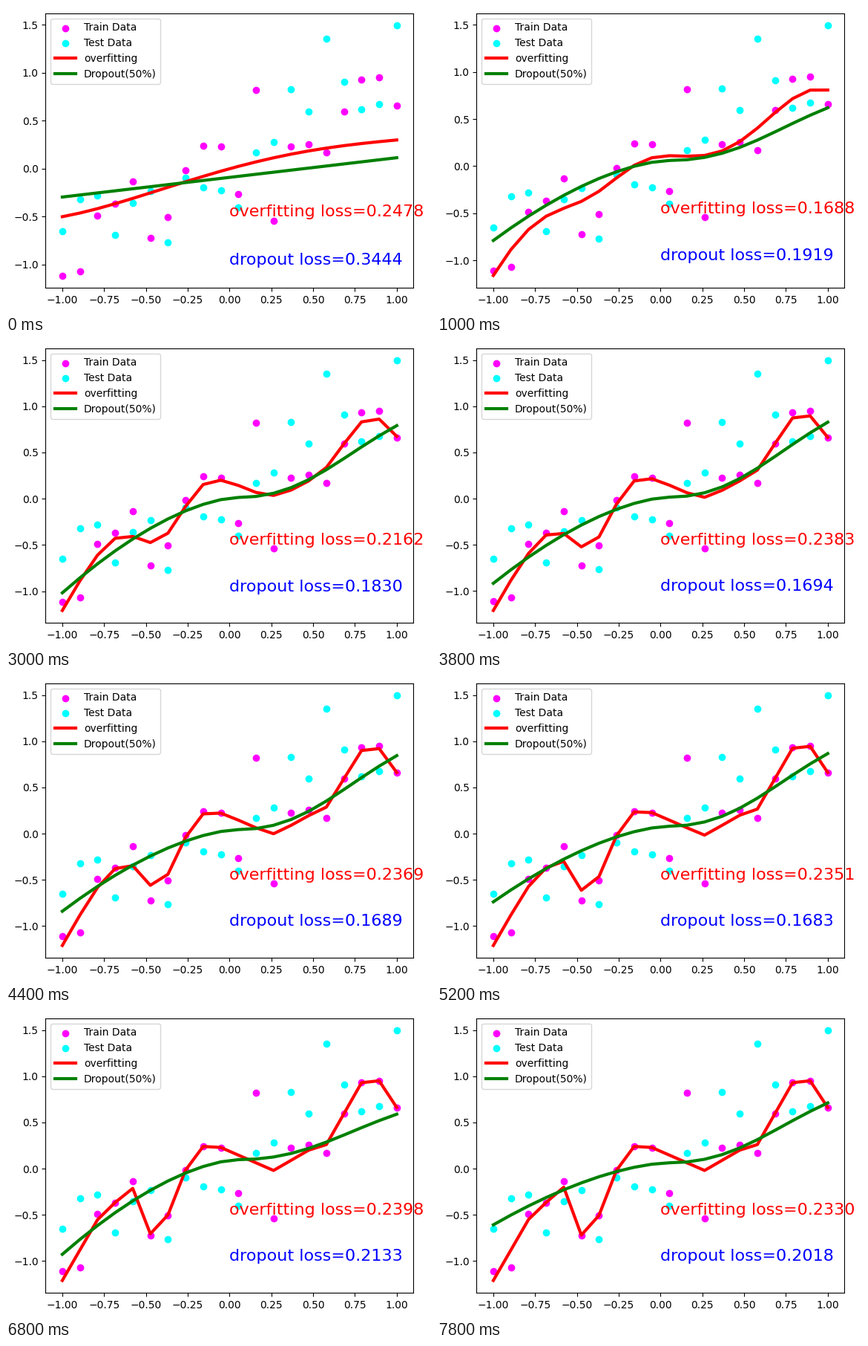
These frames come from a looping animation (573x413 px, 8 s). A matplotlib script:

```python
import numpy as np
import matplotlib.pyplot as plt
from matplotlib.animation import FuncAnimation

W, H, DPI = 573, 413, 100
FRAMES, INTERVAL = 40, 200
WARMUP = 5  # frames until both nets leave their untrained shape

x = np.linspace(-1, 1, 20)
train = np.array([-1.113, -1.07, -.488, -.366, -.133, -.72, -.507, -.017, .24, .229,
                  -.262, .818, -.54, .229, .258, .167, .595, .93, .95, .661])
test = np.array([-.651, -.319, -.279, -.69, -.356, -.235, -.767, -.093, -.193, -.224,
                 -.402, .167, .282, .827, .598, 1.353, .909, .618, .675, 1.492])

# Readings at a few stages of the training
stages = [0, 5, 11, 19, 26, 34, 39]
over_loss = [.2478, .1688, .1942, .2383, .2351, .2398, .2330]
drop_loss = [.3444, .1919, .1965, .1694, .1683, .2133, .2018]
drop_mid = [.06, .06, .012, .016, .08, .097, .063]
drop_left = [.85, .85, 1.13, .932, .818, 1.024, .671]
drop_right = [.56, .56, .742, .811, .786, .492, .648]

# The overfitted net ends on the training points but cuts across the outliers
index = np.arange(len(x))
fit = train.copy()
fit[[0, 2, 4, 12, 14, 15]] = -1.21, -.55, -.2, -.02, .2, .26
kept = np.setdiff1d(index, [1, 10, 11, 13])
fit = np.interp(index, kept, fit[kept])


def staged(frame, values):
    return np.interp(frame, stages, values)


def local_fit(i, width):
    """Value at point i of a line fitted to its neighbourhood."""
    d = index - i
    return np.polyfit(d, fit, 1, w=np.exp(-(d / width) ** 2 / 4))[1]


def warm(frame, start, curve):
    return start + (curve - start) * min(frame / WARMUP, 1)


def over_curve(frame):
    """Fit whose smoothing narrows with time, more slowly on the left."""
    decay = np.where(x < -.3, 18, 13)
    widths = np.maximum(1.8 * np.exp(-max(frame - WARMUP, 0) / decay), .25)
    start = .48 * x - .16 * x**2 - .08 * x**3 + .06 * x**4
    return warm(frame, start, np.array([local_fit(i, s) for i, s in zip(index, widths)]))


def drop_curve(frame):
    """Plateau with a falling left arm and a rising right arm."""
    left = np.maximum(.05 - x, 0) / 1.05
    right = np.maximum(x - .05, 0) / .95
    curve = (staged(frame, drop_mid)
             - staged(frame, drop_left) * left ** 1.62
             + staged(frame, drop_right) * right ** 2 * (1 + .25 * np.sin(np.pi * right)))
    return warm(frame, .205 * x - .09, curve)


fig = plt.figure(figsize=(W / DPI, H / DPI), dpi=DPI, facecolor="white")
ax = fig.add_axes([53.4 / W, 33.7 / H, 496 / W, 369.6 / H])
ax.scatter(x, train, c="magenta", label="Train Data")
ax.scatter(x, test, c="cyan", label="Test Data")
over_line, = ax.plot(x, over_curve(0), "red", lw=3, label="overfitting")
drop_line, = ax.plot(x, drop_curve(0), "green", lw=3, label="Dropout(50%)")
over_text = ax.text(0, -0.5, "", size=16, color="red")
drop_text = ax.text(0, -1, "", size=16, color="blue")
ax.legend(loc="upper left")
ax.set_xlim(-1.1, 1.1)


def update(frame):
    over, drop = over_curve(frame), drop_curve(frame)
    over_line.set_ydata(over)
    drop_line.set_ydata(drop)
    over_text.set_text(f"overfitting loss={staged(frame, over_loss):.4f}")
    drop_text.set_text(f"dropout loss={staged(frame, drop_loss):.4f}")

    shown = np.concatenate([train, test, over, drop])
    low, high = shown.min(), shown.max()
    pad = 0.05 * (high - low)
    ax.set_ylim(low - pad, high + pad)
    return over_line, drop_line, over_text, drop_text


anim = FuncAnimation(fig, update, frames=FRAMES, interval=INTERVAL,
                     repeat=True, repeat_delay=0, blit=False)
plt.show()
```
